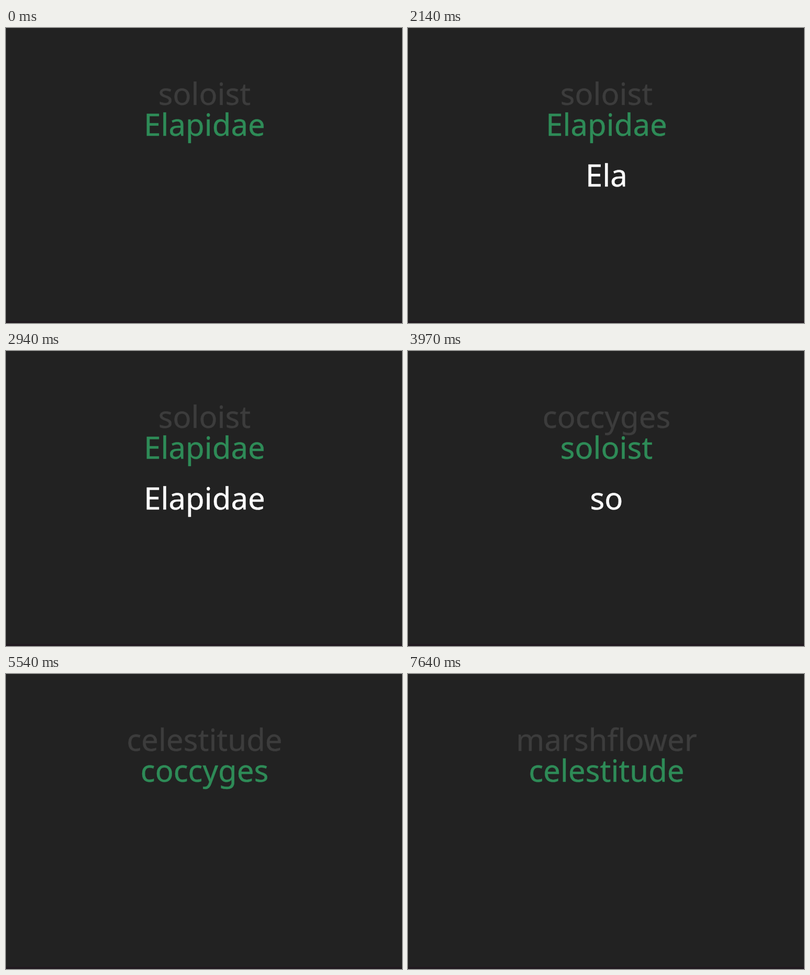
Animation of 756 by 564 pixels, one loop 8 s. Source, as an HTML page:

```html
<!DOCTYPE html>
<html lang="en">
<head>
<meta charset="utf-8">
<title>Typing game</title>
<style>
  html, body { margin: 0; width: 100%; height: 100%; overflow: hidden; background: #222; }
  svg { display: block; width: 756px; height: 564px; }
  text {
    font: 400 58px "Noto Sans", "Open Sans", sans-serif;
    text-anchor: middle;
    fill: currentColor;
    stroke: currentColor;
    stroke-width: 0.4px;
  }
  #next { color: #3c3c3c; }
  #word { color: #2e8b57; }
  #typed { color: #fff; }
</style>
</head>
<body>
<svg viewBox="0 0 756 564">
  <rect y="560" width="756" height="4" fill="#211a20"/>
  <text id="next" x="379" y="147"></text>
  <text id="word" x="379" y="206"></text>
  <text id="typed" x="379" y="303"></text>
</svg>
<script>
  const LOOP = 8000;

  // Each burst types at an even pace from one prefix of the word to another.
  const burst = (from, to, start, end) => ({ from, to, start, end });
  const rounds = [
    { word: "Elapidae", start: 0,
      bursts: [burst("E", "Elap", 500, 1840), burst("Ela", "Elapidae", 2140, 2940)] },
    { word: "soloist", start: 2970,
      bursts: [burst("s", "solo", 3840, 4200), burst("soloi", "soloist", 4900, 5510)] },
    { word: "coccyges", start: 5540,
      bursts: [burst("c", "coccy", 6040, 6640), burst("coccyg", "coccyge", 7070, 7340)] },
    { word: "celestitude", start: 7640, bursts: [] },
    { word: "marshflower", start: LOOP, bursts: [] }
  ];

  const latest = (list, t) => list.findLastIndex(item => t >= item.start);

  function typedAt(bursts, t) {
    const b = bursts[latest(bursts, t)];
    if (!b) return "";
    const progress = Math.min(1, (t - b.start) / (b.end - b.start));
    const added = Math.floor(progress * (b.to.length - b.from.length));
    return b.to.slice(0, b.from.length + added);
  }

  function setText(id, value) {
    const el = document.getElementById(id);
    if (el.textContent !== value) el.textContent = value;
  }

  function draw(t) {
    const i = latest(rounds, t);
    setText("next", rounds[i + 1].word);
    setText("word", rounds[i].word);
    setText("typed", typedAt(rounds[i].bursts, t));
  }

  const origin = performance.now();
  function tick() {
    draw((performance.now() - origin) % LOOP);
    requestAnimationFrame(tick);
  }
  tick();
</script>
</body>
</html>
```
